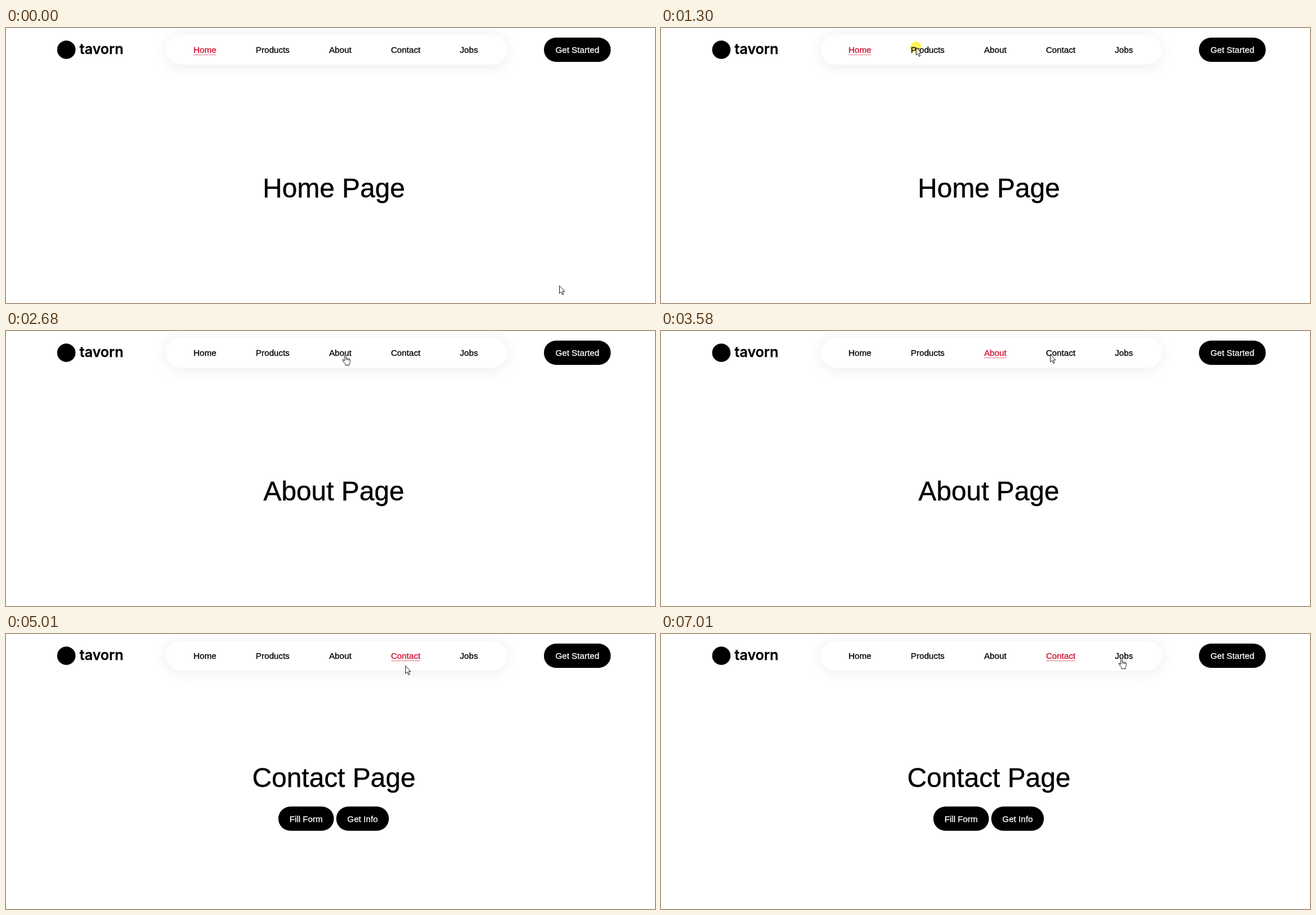
An HTML page that plays this animation: 1151 by 487 pixels, repeating every 8000 ms.

```html
<!DOCTYPE html>
<html lang="en">
<head>
<meta charset="utf-8">
<title>Navigation demo</title>
<style>
  html, body { margin: 0; width: 100%; height: 100%; overflow: hidden; background: #fff; }
  svg { display: block; width: 1151px; height: 487px; font: 15.2px "Liberation Sans", Arial, sans-serif; }
  text { stroke: currentColor; fill: currentColor; stroke-width: .3px; }
  .title { font-size: 47.8px; stroke-width: .4px; }
  .logo { font: 600 25px Inter, sans-serif; }
  .middle { text-anchor: middle; }
  .light { color: #fff; }
  #click { mix-blend-mode: multiply; }
  #cursor path { fill: #fff; stroke: #181818; stroke-linejoin: round; }
</style>
</head>
<body>
<svg viewBox="0 0 1151 487">
  <defs>
    <filter id="blur" x="-20%" y="-150%" width="140%" height="400%">
      <feGaussianBlur stdDeviation="14"/>
    </filter>
  </defs>
  <rect width="1151" height="487" fill="#fff"/>
  <circle cx="107" cy="38.5" r="16.3"/>
  <text class="logo" x="130.5" y="46">tavorn</text>
  <rect x="284" y="15" width="604" height="53" rx="26.5" opacity=".075" filter="url(#blur)"/>
  <rect x="284" y="12" width="604" height="53" rx="26.5" fill="#fff"/>
  <g id="links"></g>
  <g id="start"></g>
  <text id="title" class="title middle" x="581.5"></text>
  <g id="actions"></g>
  <circle id="click" r="10" fill="#fff238" opacity=".85"/>
  <g id="cursor">
    <path id="arrow" d="M.5 .5V14L3.6 11.2L5.8 16.3L7.9 15.4L5.8 10.4H9.7Z"/>
    <g id="hand" transform="translate(-4.3 0)">
      <path d="M4.5 12V2A1.4 1.4 0 0 1 7.3 2V7.5Q8.8 6.3 9.8 8Q11.4 7 12.2 8.7Q14.5 8 14.5 10.5V13.5Q14.4 15.5 13 17.2V19.5H6.2V17.5Q4 15.3 2.4 12.7Q.2 10.6 1.3 9.7Q2.5 9 4.5 12Z"/>
      <path d="M7.3 7.5V10.5M9.8 8V11M12.2 8.7V11.2"/>
    </g>
  </g>
</svg>
<script>
const LOOP = 8000, STEP = 70, FADE = 210, PRESS = 130, LINK_GAP = 70;
const $ = id => document.getElementById(id);

// Releasing the button opens the page; the last one stays unopened.
const clicks = [
  { at: 1230, page: "Products" },
  { at: 2550, page: "About" },
  { at: 4460, page: "Contact" },
  { at: 6880 }
];

// Each move starts where the previous one ended; bend is the curve's control point.
const home = [981, 456];
const moves = [
  { from: 70, to: 200, end: [509, 203] },
  { from: 400, to: 1160, end: [452, 34], bend: [160, -60] },
  { from: 1450, to: 1590, end: [456, 41], hand: true },
  { from: 1730, to: 2220, end: [600, 41], bend: [528, 57], hand: true },
  { from: 3370, to: 3650, end: [713, 45], bend: [655, 34] },
  { from: 3850, to: 4260, end: [707, 37], hand: true },
  { from: 5010, to: 5160, end: [734, 179], bend: [702, 44] },
  { from: 5360, to: 6120, end: [795, 53], bend: [915, 85] },
  { from: 6190, to: 6600, end: [815, 42], hand: true }
];
moves.forEach((move, i) => {
  move.start = i ? moves[i - 1].end : home;
  move.bend ??= move.start.map((v, axis) => (v + move.end[axis]) / 2);
});

function make(tag, attrs, parent, content = "") {
  const node = document.createElementNS("http://www.w3.org/2000/svg", tag);
  for (const key in attrs) node.setAttribute(key, attrs[key]);
  node.textContent = content;
  return parent.appendChild(node);
}

function makeButton(label, x, y, width, parent) {
  make("rect", { x, y, width, height: 43, rx: 21.5 }, parent);
  make("text", { x: x + width / 2, y: y + 27, class: "light middle" }, parent, label);
}

makeButton("Get Started", 954, 17, 118.5, $("start"));
makeButton("Fill Form", 483, 305.5, 98.5, $("actions"));
makeButton("Get Info", 585.7, 305.5, 93.3, $("actions"));

let linkX = 332.5;
const links = ["Home", "Products", "About", "Contact", "Jobs"].map(name => {
  const x = linkX;
  const label = make("text", { x, y: 44 }, $("links"), name);
  const width = label.getComputedTextLength();
  const line = make("rect", { x, y: 47, width, height: 1, fill: "#d20e30" }, $("links"));
  linkX += width + LINK_GAP;
  return { name, label, line };
});

function pageAt(t) {
  const opened = clicks.filter(click => click.page && click.at + PRESS <= t).pop();
  if (!opened) return { name: "Home", heat: 1 };
  const steps = Math.floor((t - opened.at - PRESS) / STEP);
  return { name: opened.page, heat: Math.min(1, steps * STEP / FADE) };
}

function pointerAt(t) {
  const move = moves.filter(({ from }) => from <= t).pop();
  if (!move) return { pos: home, hand: false };
  const { from, to, start, bend, end, hand } = move;
  const count = Math.round((to - from) / STEP) + 1;
  const p = t >= to ? 1 : Math.min(1, (Math.floor((t - from) / STEP) + 1) / count);
  const q = 1 - p;
  const pos = start.map((v, axis) =>
    Math.round(q * q * v + 2 * q * p * bend[axis] + p * p * end[axis]));
  return { pos, hand: hand && p === 1 };
}

function show(node, visible) {
  node.setAttribute("visibility", visible ? "visible" : "hidden");
}

function draw(t) {
  const page = pageAt(t);
  for (const { name, label, line } of links) {
    const mix = name === page.name ? page.heat : 0;
    label.style.color = `rgb(${210 * mix},${14 * mix},${48 * mix})`;
    line.setAttribute("opacity", mix * 0.6);
  }

  const isContact = page.name === "Contact";
  $("title").textContent = page.name + " Page";
  $("title").setAttribute("y", isContact ? 271 : 300);
  show($("actions"), isContact);

  const { pos, hand } = pointerAt(t);
  const place = `translate(${pos})`;
  $("cursor").setAttribute("transform", place);
  $("click").setAttribute("transform", place);
  show($("arrow"), !hand);
  show($("hand"), hand);
  show($("click"), clicks.some(({ at }) => t >= at && t < at + PRESS));
}

const startTime = performance.now();
function tick() {
  draw((performance.now() - startTime) % LOOP);
  requestAnimationFrame(tick);
}
tick();
</script>
</body>
</html>
```
